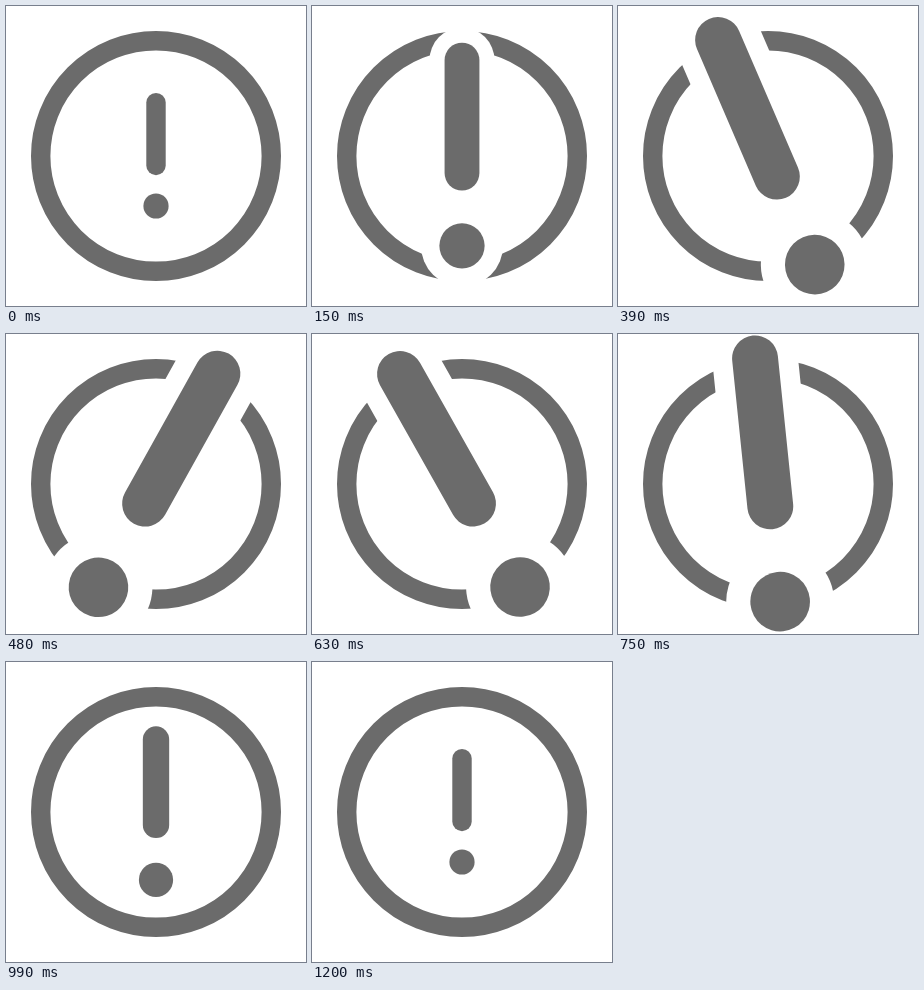
An HTML page with a canvas for the animation above (3230 ms loop, 300 by 300 pixels).

```html
<!DOCTYPE html>
<html lang="en">
<head>
<meta charset="utf-8">
<title>Alert icon</title>
<style>
  html, body { margin: 0; width: 100%; height: 100%; overflow: hidden; background: #fff; }
  canvas { display: block; width: 300px; height: 300px; }
</style>
</head>
<body>
<canvas id="stage"></canvas>
<script>
const LOOP = 3230, STEP = 30, MOVE_END = 1200, SIZE = 300;
const GRAY = '#6b6b6b', WHITE = '#fff';
const BIG = 2.365, TILT = 30;

// [time in ms, value]: grow, shake at full size, shrink
const scaleKeys = [[0, 1], [270, BIG], [800, BIG], [1086, 1]];
const angleKeys = [[239, 0], [364, -TILT], [489, TILT], [614, -TILT], [804, 0]];

const canvas = document.getElementById('stage');
const ctx = canvas.getContext('2d');
const dpr = window.devicePixelRatio || 1;
canvas.width = canvas.height = SIZE * dpr;

const ease = p => p * p * (3 - 2 * p);

function valueAt(keys, t) {
  if (t <= keys[0][0]) return keys[0][1];
  for (let i = 1; i < keys.length; i++) {
    const [t0, a] = keys[i - 1], [t1, b] = keys[i];
    if (t < t1) return a + (b - a) * ease((t - t0) / (t1 - t0));
  }
  return keys[keys.length - 1][1];
}

function mark(color, barRadius, dotRadius) {
  ctx.strokeStyle = ctx.fillStyle = color;
  ctx.lineWidth = barRadius * 2;
  ctx.lineCap = 'round';
  ctx.beginPath();
  ctx.moveTo(0, -53.4);
  ctx.lineTo(0, 9.5);
  ctx.stroke();
  ctx.beginPath();
  ctx.arc(0, 50, dotRadius, 0, Math.PI * 2);
  ctx.fill();
}

function draw(t) {
  ctx.setTransform(dpr, 0, 0, dpr, 0, 0);
  ctx.fillStyle = WHITE;
  ctx.fillRect(0, 0, SIZE, SIZE);
  ctx.translate(SIZE / 2, SIZE / 2);

  ctx.strokeStyle = GRAY;
  ctx.lineWidth = 19.4;
  ctx.beginPath();
  ctx.arc(0, 0, 115.3, 0, Math.PI * 2);
  ctx.stroke();

  const s = valueAt(scaleKeys, t);
  ctx.rotate(valueAt(angleKeys, t) * Math.PI / 180);
  ctx.scale(s, s);
  mark(WHITE, 18.1, 22.8); // gap cut into the ring
  mark(GRAY, 9.7, 12.6);
}

const start = performance.now();

function tick() {
  const t = (performance.now() - start) % LOOP;
  draw(Math.min(MOVE_END, Math.floor(t / STEP) * STEP));
  requestAnimationFrame(tick);
}
tick();
</script>
</body>
</html>
```
